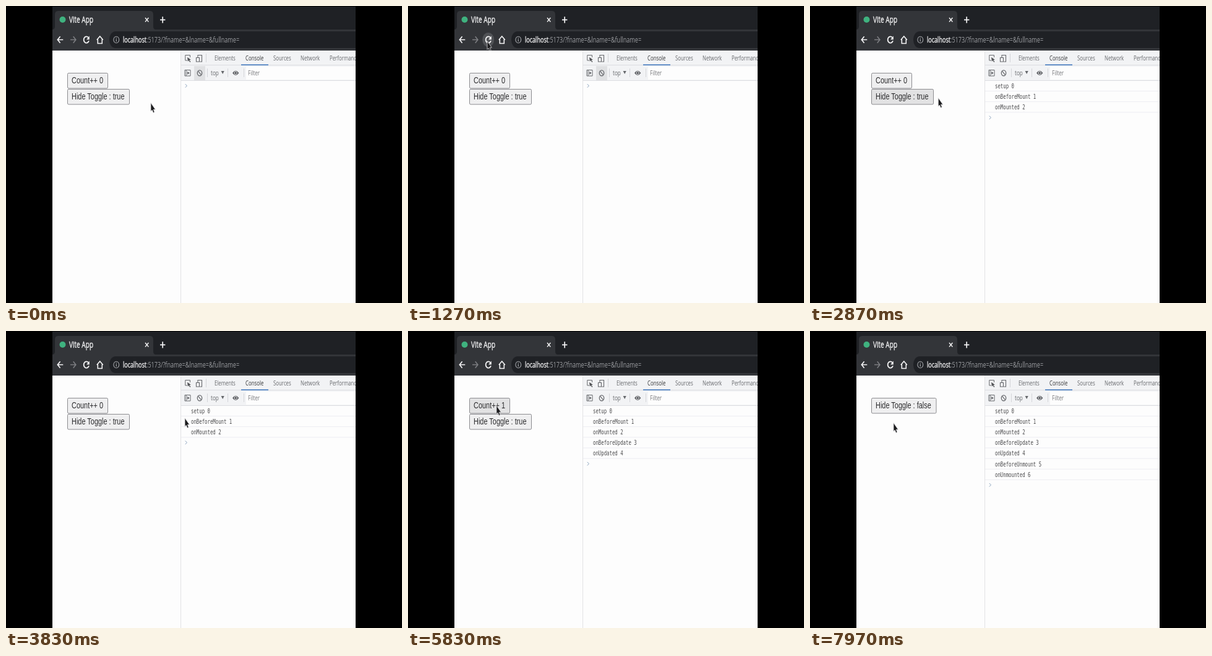
An HTML page that plays this animation: 640 px wide and 480 px high, repeating every 8000 ms.

```html
<!DOCTYPE html>
<html lang="en">
<head>
<meta charset="utf-8">
<title>Lifecycle hooks</title>
<style>
  html, body { margin: 0; width: 100%; height: 100%; overflow: hidden; background: #000; }
  svg { display: block; width: 640px; height: 480px; }
  text { white-space: pre; }
  .ui { font-family: "Open Sans", "Noto Sans", sans-serif; }
  .btn { font-family: "Liberation Sans", Arial, sans-serif; }
  .log { font-family: "DejaVu Sans Mono", monospace; }
  .bright { stroke: #f4f4f5; stroke-width: 0.35px; }
  .line { fill: none; stroke-linecap: butt; }
</style>
</head>
<body>
<svg id="stage" viewBox="0 0 640 480" xmlns="http://www.w3.org/2000/svg"></svg>
<script>
const LOOP = 8000;
const SQUEEZE = 0.72;
const stage = document.getElementById('stage');

function add(tag, attrs, parent = stage) {
  const el = document.createElementNS(stage.namespaceURI, tag);
  for (const k in attrs) el.setAttribute(k, attrs[k]);
  parent.appendChild(el);
  return el;
}
const rect = (x, y, width, height, fill, more, parent) =>
  add('rect', { x, y, width, height, fill, ...more }, parent);
const line = (d, stroke, width = 1, parent) =>
  add('path', { d, stroke, 'stroke-width': width, class: 'line' }, parent);
function text(str, x, y, size, fill, cls = 'ui', parent) {
  const el = add('text', {
    transform: `translate(${x} ${y}) scale(${SQUEEZE} 1)`,
    'font-size': size, fill, class: cls
  }, parent);
  el.textContent = str;
  return el;
}

const DARK = '#1f2125', BAR = '#333539', PAPER = '#fdfdfd', TINT = '#f2f3f5';
const RULE = '#ededf2', ICON = '#66686c', WHITE = '#f4f4f5';

// Tab strip
rect(75, 1, 490, 71, DARK);
add('path', { d: 'M75 38Q79 38 79 33V14Q79 8 84 8H233Q238 8 238 14V33Q238 38 242 38H565V72H75Z', fill: BAR });
add('circle', { cx: 91.5, cy: 22, r: 5, fill: '#3fb27f' });
text('Vite App', 102, 27, 14, WHITE, 'ui bright');
line('M225 19l5.4 6.6M230.4 19l-5.4 6.6', WHITE, 1.5);
line('M249 22.3h8.4M253.2 17.2v10.2', WHITE, 1.7);

// Navigation bar
const reloadGlow = add('ellipse', { cx: 129.7, cy: 54.5, rx: 9.5, ry: 11.5, fill: '#505256' });
rect(167, 41, 420, 27, DARK, { rx: 10, ry: 13 });
line('M92.3 54.5h-8.8M87.6 49.3l-4.2 5.2 4.2 5.2', WHITE, 1.7);
line('M104 54.5h8.8M108.7 49.3l4.2 5.2-4.2 5.2', '#7c7d81', 1.6);
line('M133.2 51.2A4.3 5.1 0 1 0 134 56.3', WHITE, 1.8);
add('path', { d: 'M134.8 48.6v5.6h-4.7z', fill: WHITE });
line('M146.8 54.8l5-5.9 5 5.9M148.3 53.8v6.7h7v-6.7', WHITE, 1.6);
add('ellipse', { cx: 178.3, cy: 54.5, rx: 4.4, ry: 5.3, fill: 'none', stroke: '#a4a6aa', 'stroke-width': 1.1 });
line('M178.3 53.6v3.8M178.3 51.2v1.3', '#a4a6aa', 1.2);
const url = text('', 189, 59, 12.6, '#9b9da1');
add('tspan', { class: 'bright', fill: WHITE }, url).textContent = 'localhost';
add('tspan', {}, url).textContent = ':5173/?fname=&lname=&fullname=';

// Page and developer tools
rect(75, 72, 490, 408, PAPER);
rect(283, 72, 282, 49, TINT);
line('M282.5 72V480', '#e2e2e4');
line('M283 95.5H565M283 120.5H565', '#dcdde1');
rect(388, 98, 177, 21, PAPER);
rect(380, 94.3, 44, 1.7, '#4c7fc0');
line('M323.5 77v14M325.5 101v14M358.5 101v14M384.5 101v14', '#d4d5d9');

const clearGlow = rect(304, 97, 18, 23, '#e0e1e3');
[['Elements', 337], ['Console', 387], ['Sources', 432], ['Network', 476], ['Performance', 523]]
  .forEach(([name, x]) => text(name, x, 87.6, 10.9, name === 'Console' ? '#333436' : ICON));
text('top', 331, 112, 11.4, ICON);
add('path', { d: 'M347.6 105h5.2l-2.6 5z', fill: ICON });
text('Filter', 391, 112, 11.4, '#77787b');

line('M293 88h-3.2v-8.5h7.7v3.5', ICON, 1);
add('path', { d: 'M293 82.8l5.8 3.9-2.4.6 2 2.7-1 .9-2-2.8-1.4 1.7z', fill: '#505154' });
line('M310 83.5v-4h6.5v10.5h-3.2M307.5 83.5h5v6.5h-5z', ICON, 1.1);
line('M289 103.5h9v9.5h-9zM291.2 103.5v9.5', ICON, 1);
add('path', { d: 'M293 105.6l3.6 2.7-3.6 2.7z', fill: ICON });
add('ellipse', { cx: 313, cy: 108.3, rx: 3.7, ry: 4.5, fill: 'none', stroke: ICON, 'stroke-width': 1.3 });
line('M310.4 105.2l5.2 6.2', ICON, 1.2);
add('path', { d: 'M366 108.2Q371.2 100.8 376.4 108.2 371.2 115.6 366 108.2Z', fill: '#5b5d61' });
add('ellipse', { cx: 371.2, cy: 108.2, rx: 2.1, ry: 2.6, fill: '#5b5d61', stroke: TINT, 'stroke-width': 0.9 });

// Console output: each hook prints its name and a running number
const PITCH = 17.12;
const rows = ['setup', 'onBeforeMount', 'onMounted', 'onBeforeUpdate', 'onUpdated', 'onBeforeUnmount', 'onUnmounted']
  .map((hook, i) => {
    const row = add('g', { transform: `translate(0 ${i * PITCH})` });
    text(`${hook} ${i}`, 299, 133, 10.2, '#4a4a4c', 'log', row);
    line('M283 137.6H565', RULE, 1, row);
    return row;
  });
const prompt = line('M289.8 126.2l2.6 2.8-2.6 2.8', '#8aa3bd', 1);

// Page buttons
function button(width) {
  const g = add('g', {});
  const box = rect(99.5, 0.5, width, 24.5, '', { rx: 1.6, ry: 2, stroke: '#8c8c90' }, g);
  const label = text('', 106, 17.4, 15.2, '#2c2c2e', 'btn', g);
  return { g, box, label };
}
const count = button(65), toggle = button(100);

rect(0, 0, 75, 480, '#000');
rect(565, 0, 75, 480, '#000');

const cursor = add('path', {
  d: 'M0-.5V13.3L2.2 11 4 15.6 6 14.5 4.3 10.2H7.4Z',
  fill: '#1c1c1e', stroke: '#e6e6e8', 'stroke-width': 0.7
});

// time, x, y of the pointer tip
const TRACK = [
  [0, 234, 157], [430, 234, 157], [730, 150, 79], [1000, 136, 64], [1230, 128, 57],
  [2600, 128, 57], [2790, 178, 140], [2870, 207, 149], [3130, 288, 139],
  [3470, 288, 139], [3530, 289, 141], [3830, 289, 141], [3930, 295, 154],
  [4330, 295, 154], [4630, 183, 120], [5070, 143, 121],
  [6830, 143, 121], [7100, 138, 139], [7330, 135, 149], [LOOP, 135, 149]
];
const LOADED = 1500, COUNTED = 5600, HIDDEN = 7870, HOVER_LAG = 70;

function pointer(t) {
  const i = Math.max(1, TRACK.findIndex(p => p[0] >= t));
  const [t0, x0, y0] = TRACK[i - 1], [t1, x1, y1] = TRACK[i];
  const k = Math.max(0, (t - t0) / (t1 - t0));
  return [x0 + (x1 - x0) * k, y0 + (y1 - y0) * k];
}

const show = (el, on) => el.setAttribute('visibility', on ? 'visible' : 'hidden');
const inside = ([px, py], x, y, w, h) => px >= x && px <= x + w && py >= y && py <= y + h;

function place(btn, y, width, str, hot) {
  btn.g.setAttribute('transform', `translate(0 ${y})`);
  btn.box.setAttribute('width', width);
  btn.box.setAttribute('fill', inside(hot, 99, y, width, 25) ? '#e2e2e3' : '#efeff0');
  if (btn.label.textContent !== str) btn.label.textContent = str;
}

function draw(t) {
  const hot = pointer(Math.max(0, t - HOVER_LAG));
  const hidden = t >= HIDDEN;
  const printed = hidden ? 7 : t >= COUNTED ? 5 : t >= LOADED ? 3 : 0;

  cursor.setAttribute('transform', `translate(${pointer(t)})`);
  show(reloadGlow, inside(hot, 120, 43, 19, 23));
  show(clearGlow, t < LOADED);
  rows.forEach((row, i) => show(row, i < printed));
  prompt.setAttribute('transform', `translate(0 ${printed * PITCH})`);

  show(count.g, !hidden);
  place(count, 108, 65, `Count++ ${t >= COUNTED ? 1 : 0}`, hot);
  place(toggle, hidden ? 108 : 134, hidden ? 104.5 : 100, `Hide Toggle : ${!hidden}`, hot);
}

const start = performance.now();
function tick() {
  draw((performance.now() - start) % LOOP);
  requestAnimationFrame(tick);
}
tick();
</script>
</body>
</html>
```
